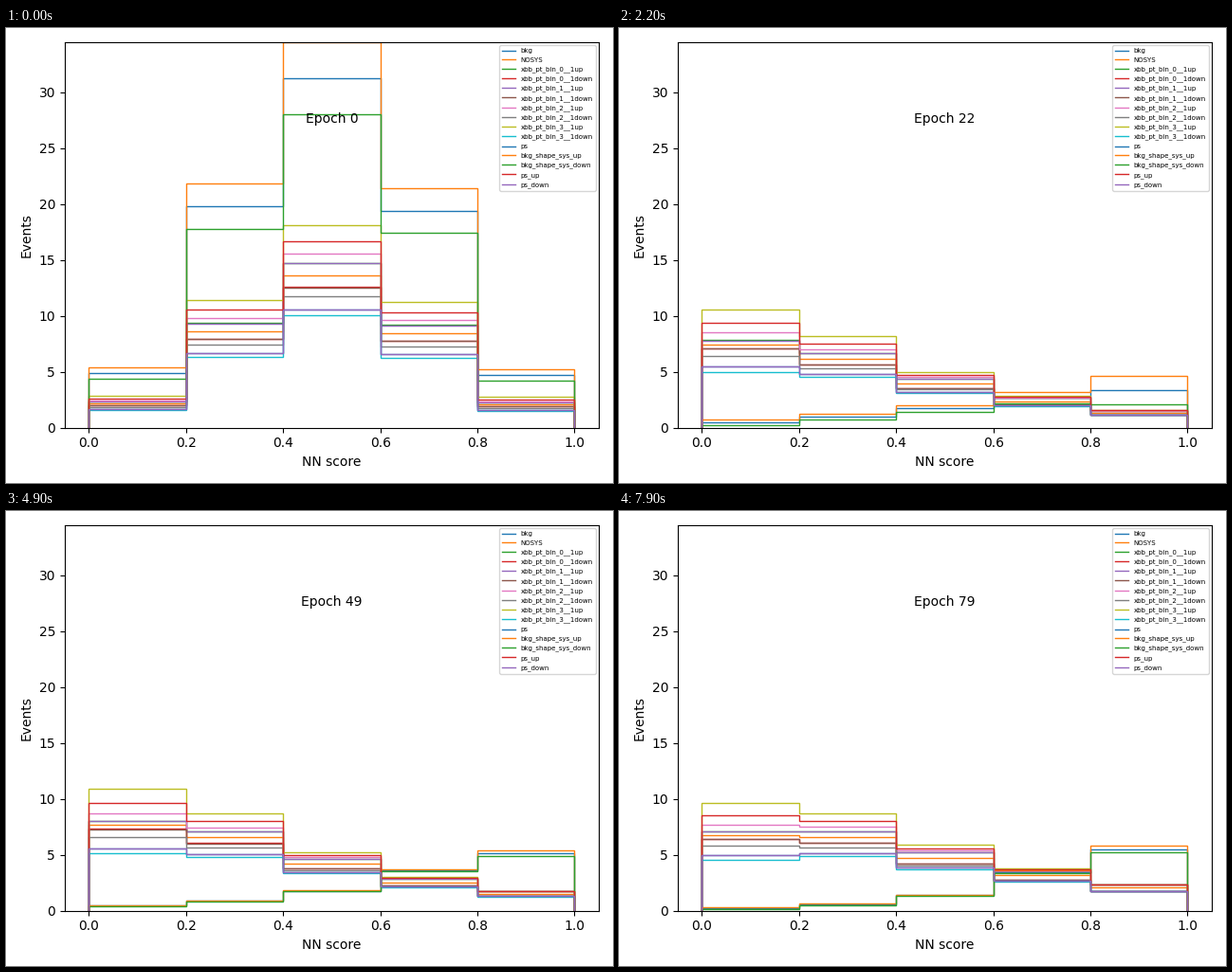
Animation of 640x480 px, one loop 8000 ms. Source, as a matplotlib script:

```python
import matplotlib.pyplot as plt
import numpy as np
from matplotlib.animation import FuncAnimation

EPOCHS = 80
EDGES = np.linspace(0, 1, 6)
X = (EDGES[:-1] + EDGES[1:]) / 2

# Training state at a few epochs, linear in between
KNOTS = [13, 22, 35, 49, 68, 79]
STATE = {
    "sig_total": [21.4, 21.2, 23.2, 22.5, 22.9, 23.3],
    "sig_tilt": [-1.13, -1.0, 0.05, -0.78, -0.6, -0.13],
    "sig_bend": [3.3, 1.65, 1.5, 1.8, 1.65, 1.95],
    "bkg_top": [2.74, 3.35, 4.42, 5.14, 5.63, 5.52],
    "bkg_slope": [2.0, 2.8, 4.2, 3.5, 4.2, 4.6],
    "bkg_shape": [0.85, 1.28, 0.95, 0.25, 0.2, 0.3],
}

# Relative size of the up and down variations of the signal
SPREAD = {
    "xbb_pt_bin_0": (0.082, 0.078),
    "xbb_pt_bin_1": (0.079, 0.081),
    "xbb_pt_bin_2": (0.140, 0.140),
    "xbb_pt_bin_3": (0.325, 0.262),
    "ps": (0.220, 0.223),
}
COMMON = 0.14  # size every variation approaches at high score

START = np.exp(-((X - 0.498) / 0.207) ** 2 / 2)
START /= START.sum()
START_SIG = 35 * START
START_BKG = 80.2 * START

NAMES = ["bkg", "NOSYS"]
NAMES += [f"xbb_pt_bin_{i}__1{d}" for i in range(4) for d in ("up", "down")]
NAMES += ["ps", "bkg_shape_sys_up", "bkg_shape_sys_down", "ps_up", "ps_down"]


def trained_signal(total, tilt, bend):
    h = np.exp(tilt * X - bend * np.maximum(X - 0.3, 0) ** 1.15)
    return total * h / h.sum()


def trained_background(top, slope):
    return top * np.exp(-slope * np.maximum(0.8 - X, 0))


def by_score(size):
    return COMMON + (size - COMMON) * ((1 - X) / 0.7) ** 1.7


def heights(epoch):
    s = {key: np.interp(epoch, KNOTS, vals) for key, vals in STATE.items()}
    old = np.exp(-epoch / 4.7)  # what is left of the untrained network

    def mix(start, trained):
        return old * start + (1 - old) * trained

    sig = trained_signal(s["sig_total"], s["sig_tilt"], s["sig_bend"])
    bkg = mix(START_BKG, trained_background(s["bkg_top"], s["bkg_slope"]))
    shape = mix(0.103 * START_BKG, s["bkg_shape"] * (0.2 + 1.5 * X ** 6))
    out = {
        "bkg": bkg,
        "NOSYS": mix(START_SIG, sig),
        "bkg_shape_sys_up": bkg + shape,
        "bkg_shape_sys_down": np.maximum(bkg - shape, 0),
    }
    for name, (up, down) in SPREAD.items():
        stem = name + ("_" if name == "ps" else "__1")
        out[stem + "up"] = mix(START_SIG * (1 + up), sig * (1 + by_score(up)))
        out[stem + "down"] = mix(START_SIG * (1 - down),
                                 sig * (1 - by_score(down)))
    out["ps"] = out["ps_down"]
    return out


def outline(values):
    return np.concatenate([[0], np.repeat(values, 2), [0]])


plt.rcParams["font.family"] = "DejaVu Sans"
fig, ax = plt.subplots(figsize=(6.4, 4.8), dpi=100)
xs = np.repeat(EDGES, 2)
lines = {
    name: ax.plot(xs, np.zeros_like(xs), color=f"C{i % 10}", lw=1,
                  solid_joinstyle="miter", label=name)[0]
    for i, name in enumerate(NAMES)
}
ax.set_xlim(-0.05, 1.05)
ax.set_ylim(0, 34.49)
ax.set_xlabel("NN score")
ax.set_ylabel("Events")
ax.legend(loc="upper right", fontsize=5)
title = ax.text(0.5, 0.8, "", transform=ax.transAxes, ha="center", va="center")
fig.tight_layout()


def update(epoch):
    for name, values in heights(epoch).items():
        lines[name].set_ydata(outline(values))
    title.set_text(f"Epoch {epoch}")
    return [*lines.values(), title]


anim = FuncAnimation(fig, update, frames=EPOCHS, interval=100,
                     repeat=True, repeat_delay=0)
plt.show()
```
